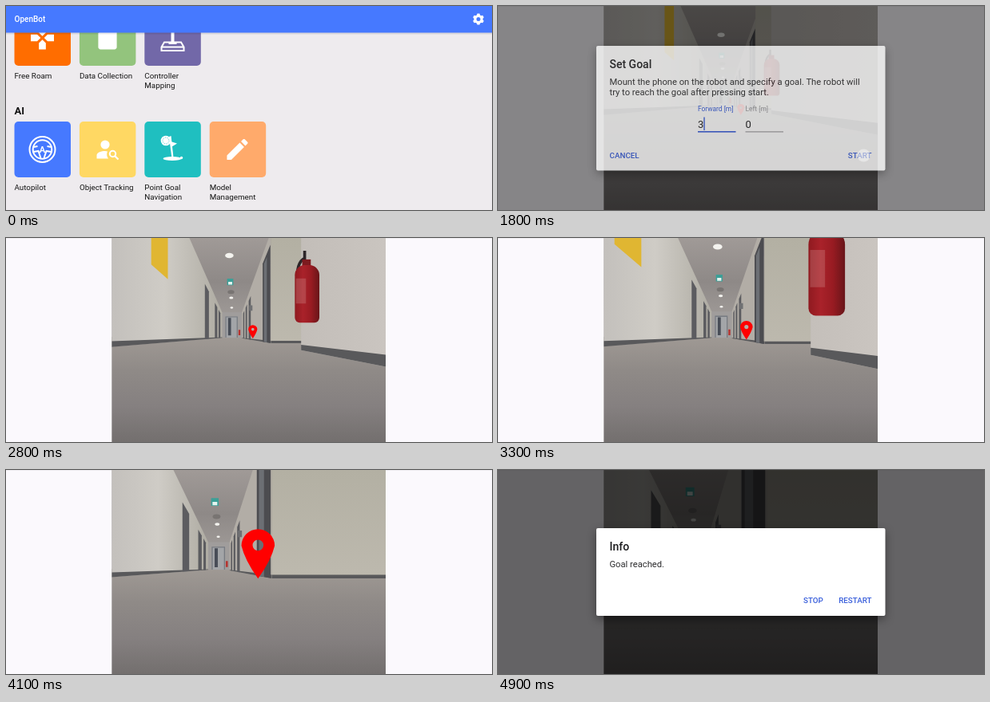
Write an HTML page with a canvas that moves like this. It is 608 px wide and 256 px high and loops after 5000 ms.

```html
<!DOCTYPE html>
<html lang="en">
<head>
<meta charset="utf-8">
<title>Point goal navigation</title>
<style>
  html, body { margin: 0; width: 100%; height: 100%; overflow: hidden; background: #fbf9fd; }
  canvas, svg { position: absolute; top: 0; left: 0; width: 608px; height: 256px; display: block; }
  text { font-family: Roboto, Arial, sans-serif; }
  .label { font-size: 9.8px; fill: #161616; }
  .body { font-size: 11.2px; fill: #2b2b2d; }
  .title { font-size: 14px; font-weight: 500; fill: #1d1d1f; }
  .button { font-size: 9.8px; font-weight: 500; fill: #375ddb; }
  .hint { font-size: 8.4px; }
  .value { font-size: 13px; fill: #1d1d1f; }
  .card { fill: #fff; filter: drop-shadow(0 4px 6px rgba(0,0,0,.4)); }
</style>
</head>
<body>
<canvas id="view" width="608" height="256"></canvas>
<svg viewBox="0 0 608 256">
  <rect id="dim" width="608" height="256"/>

  <g id="goal">
    <rect class="card" x="123" y="50" width="361.5" height="156.5" rx="2"/>
    <text class="title" x="139.5" y="78">Set Goal</text>
    <text class="body" x="139.5" y="99">Mount the phone on the robot and specify a goal. The robot will</text>
    <text class="body" x="139.5" y="112">try to reach the goal after pressing start.</text>
    <text class="hint" x="250" y="132" fill="#375ddb">Forward [m]</text>
    <text class="hint" x="309.5" y="132" fill="#9c9c9f">Left [m]</text>
    <text class="value" x="250" y="152.5">3</text>
    <text class="value" x="309.5" y="152.5">0</text>
    <rect x="257.3" y="139.5" width="1.4" height="16.5" fill="#375ddb"/>
    <rect x="250" y="157" width="47.5" height="1.6" fill="#375ddb"/>
    <rect x="309.5" y="157.4" width="47.5" height="1" fill="#8b8b8e"/>
    <text class="button" x="139.5" y="190.5">CANCEL</text>
    <text class="button" x="467.5" y="190.5" text-anchor="end">START</text>
  </g>

  <g id="info">
    <rect class="card" x="123" y="73" width="361.5" height="110" rx="2"/>
    <text class="title" x="139.5" y="101">Info</text>
    <text class="body" x="139.5" y="122">Goal reached.</text>
    <text class="button" x="382" y="167.3">STOP</text>
    <text class="button" x="467.5" y="167.3" text-anchor="end">RESTART</text>
  </g>

  <g id="menu">
    <rect width="608" height="256" fill="#eeebee"/>
    <g id="tiles"></g>
    <text x="10.5" y="136" font-size="13" font-weight="700" fill="#111">AI</text>

    <g fill="#fff">
      <path transform="translate(28.1 22.6) scale(1.45)" d="M15 7.5V2H9v5.5l3 3 3-3zM7.5 9H2v6h5.5l3-3-3-3zM9 16.5V22h6v-5.5l-3-3-3 3zM16.5 9l-3 3 3 3H22V9h-5.5z"/>
      <path transform="translate(109.6 22.6) scale(1.45)" d="M18 2h-8L4 8v12c0 1.1.9 2 2 2h12c1.1 0 2-.9 2-2V4c0-1.1-.9-2-2-2z"/>
      <path transform="translate(272.1 162.6) scale(1.45)" d="M3 17.25V21h3.75L17.81 9.94l-3.75-3.75L3 17.25zM20.71 7.04c.39-.39.39-1.02 0-1.41l-2.34-2.34c-.39-.39-1.02-.39-1.41 0l-1.83 1.83 3.75 3.75 1.83-1.83z"/>
    </g>

    <g fill="none" stroke="#fff" stroke-width="2">
      <path d="M194.5 56h28v-4.5l-3.5-6h-21l-3.5 6zM194.5 51.5h28"/>
      <path d="M208.5 28v18" stroke-width="4"/>
      <path d="M203.5 46.5h10" stroke-width="3"/>
    </g>

    <g transform="translate(45.5 180)" fill="none" stroke="#fff">
      <circle r="16" stroke-width="2"/>
      <circle r="11.8" stroke-width="2"/>
      <path d="M-11 3l6-1 3 9M11 3l-6-1-3 9M-11-3l5-1M11-3l-5-1" stroke-width="2"/>
      <text y="4" text-anchor="middle" font-size="11" font-weight="700" fill="#fff" stroke="none">A</text>
    </g>

    <g fill="#fff">
      <circle cx="124" cy="174" r="5.6"/>
      <path d="M113.5 191.5v-4c0-4 6-5.5 10.5-5.5l3 .4c-1.5 3-1 6.5 1 9.1z"/>
      <circle cx="133.5" cy="185.5" r="3.7" fill="none" stroke="#fff" stroke-width="2"/>
      <path d="M136 188l4.5 4.5" stroke="#fff" stroke-width="2.2"/>
    </g>

    <g fill="#fff">
      <circle cx="200" cy="169" r="6.3"/>
      <circle cx="200" cy="169" r="4" fill="none" stroke="#1fbfc0" stroke-dasharray="1 1.5"/>
      <path d="M204 164l2.5-1 3 27h-2.2z"/>
      <path d="M206 170l8 2.5-7.2 4.5z"/>
      <ellipse cx="208" cy="191.5" rx="11.5" ry="2.6"/>
      <circle cx="219.5" cy="190.5" r="1.7"/>
    </g>

    <rect y="33" width="608" height="2.5" fill="#000" opacity=".09"/>
    <rect width="608" height="33.5" fill="#4679ff"/>
    <text x="10.5" y="20" font-size="10" font-weight="500" fill="#fff">OpenBot</text>
    <g id="gear" transform="translate(591 16.5)" fill="#fff"></g>
  </g>
  <circle id="tap" r="8"/>
</svg>

<script>
const $ = id => document.getElementById(id);
const ctx = $('view').getContext('2d');
const LOOP = 5000, STEP = 100;
const clamp = v => Math.max(0, Math.min(1, v));

// ---- menu ----
const tiles = [
  [0, 5, '#ff6d00', 'Free Roam'],
  [1, 5, '#93c47d', 'Data Collection'],
  [2, 5, '#7268a8', 'Controller', 'Mapping'],
  [0, 145, '#4679ff', 'Autopilot'],
  [1, 145, '#ffd863', 'Object Tracking'],
  [2, 145, '#1fbfc0', 'Point Goal', 'Navigation'],
  [3, 145, '#ffaa6b', 'Model', 'Management']
];
$('tiles').innerHTML = tiles.map(([col, y, fill, ...lines]) => {
  const x = 10.5 + col * 81.4;
  return `<rect x="${x}" y="${y}" width="70.5" height="70" rx="5" fill="${fill}"/>` +
    lines.map((s, i) => `<text class="label" x="${x}" y="${y + 86 + i * 12}">${s}</text>`).join('');
}).join('');

$('gear').innerHTML = '<circle r="4" fill="none" stroke="#fff" stroke-width="3"/>' +
  [0, 60, 120, 180, 240, 300].map(a =>
    `<path d="M-2.2-4.5L-1.5-7h3L2.2-4.5z" transform="rotate(${a})"/>`).join('');

// ---- corridor ----
// time, vanishing point x, distance driven, sideways drift, marker depth, marker x, marker y
const poses = [
  [1800, 283, 0, 0, 2.5, 52, 32],
  [2800, 284, 1.6, 0, 2.06, 51, 4],
  [3700, 280, 3.3, 30, 1, 36, 6],
  [4500, 258, 5, 50, .114, 15.6, 7.75],
  [4900, 251, 5.7, 60, .1, 15, 7.7]
];
const HORIZON = 124, CEIL = 1000, LEFT = -440, RIGHT = 360, NEAR = 305;
const END = 34, NICHE = 9.2, CORNER = 5.18;
const SKIRT = '#59595b', FRAME = '#5c5c60';
let vx, dist, drift;

function poseAt(t) {
  if (t <= poses[0][0]) return poses[0];
  const i = poses.findIndex(p => p[0] >= t);
  const a = poses[i - 1], b = poses[i], k = (t - a[0]) / (b[0] - a[0]);
  return a.map((v, n) => v + (b[n] - v) * k);
}

function project(x, y, z) {
  const depth = Math.max(z - dist, .2);
  return [vx + (x - drift) / depth, HORIZON - y / depth];
}

function poly(fill, ...pts) {
  ctx.fillStyle = fill;
  ctx.beginPath();
  pts.forEach(p => ctx.lineTo(...project(...p)));
  ctx.fill();
}

// panel along the corridor, and panel facing the viewer
const side = (fill, x, z0, z1, lo, hi) =>
  poly(fill, [x, lo, z0], [x, hi, z0], [x, hi, z1], [x, lo, z1]);
const front = (fill, z, x0, x1, lo, hi) =>
  poly(fill, [x0, lo, z], [x0, hi, z], [x1, hi, z], [x1, lo, z]);

function blend(x0, y0, x1, y1, ...colors) {
  const g = ctx.createLinearGradient(x0, y0, x1, y1);
  colors.forEach((c, i) => g.addColorStop(i / (colors.length - 1), c));
  return g;
}

function disc(fill, x, z, r) {
  const [px, py] = project(x, CEIL, z), s = r / (z - dist);
  ctx.fillStyle = fill;
  ctx.beginPath();
  ctx.ellipse(px, py, s, s * .6, 0, 0, 7);
  ctx.fill();
}

function extinguisher() {
  const z = 4.47, depth = z - dist;
  if (depth < .3) return;
  const [x, y] = project(222, 258, z);
  const w = 88 / depth, h = 207 / depth;
  ctx.strokeStyle = '#2c2528';
  ctx.lineWidth = w * .12;
  ctx.beginPath();
  ctx.moveTo(x + w * .4, y);
  ctx.lineTo(x + w * .4, y - h * .25);
  ctx.moveTo(x + w * .4, y - h * .12);
  ctx.quadraticCurveTo(x + w * .05, y - h * .05, x + w * .1, y + h * .3);
  ctx.stroke();
  ctx.fillStyle = '#7d1a1f';
  ctx.fillRect(x + w * .3, y - h * .1, w * .35, h * .12);
  ctx.fillStyle = blend(x, 0, x + w, 0, '#8f1a20', '#a9222a', '#981b22', '#681519');
  ctx.beginPath();
  ctx.roundRect(x, y, w, h, [w * .4, w * .4, w * .2, w * .2]);
  ctx.fill();
  front('rgba(225,190,188,.22)', z, 226, 262, 120, 210);
}

function corridor() {
  ctx.fillStyle = blend(0, 0, 0, 110, '#a09a97', '#8e8987', '#a39e9b');
  ctx.fillRect(132, 0, 344, 256);
  ctx.fillStyle = blend(0, 122, 0, 256, '#a09a95', '#8f8a87', '#858080', '#736f6e');
  ctx.fillRect(132, HORIZON, 344, 132);

  // far end
  front('#a09d9c', END, LEFT, RIGHT, -40, CEIL);
  front('#777b82', END, -310, 190, -30, 830);
  front('#a3a5a8', END, -270, 150, -30, 790);
  front('#484d57', END, -200, -80, 60, 770);

  // left wall
  side(blend(132, 0, vx - 20, 0, '#c3c0bc', '#cfccc6', '#b1aea5'), LEFT, 0, END, -36, CEIL);
  side(SKIRT, LEFT, 0, END, -37, -16);
  for (const [a, b] of [[14.1, 16.2], [21, 24], [26, 29.5]])
    side(FRAME, LEFT, a, b, -36, 830);
  side('#e0b632', LEFT, 5.9, 7, 390, 1400);

  // right wall
  side('#b2ada6', RIGHT, NICHE, END, -60, CEIL);
  side(SKIRT, RIGHT, NICHE, END, -60, -38);
  for (const [a, b] of [[17.8, 20], [22, 24.5], [27, 30]])
    side(FRAME, RIGHT, a, b, -60, 830);
  side('#4c4c50', RIGHT, 9.3, 11.3, -60, 890);
  side('#6c6f74', RIGHT, 10.1, 10.9, -60, 850);
  front('#6f7073', 16, 290, 350, 470, 570);
  front('#b5332f', END - 3, 200, 270, 60, 260);

  // ceiling fittings
  disc('#787472', -45, 19.4, 75);
  for (const z of [11.4, 22, 29]) disc('#f4f3ef', -45, z, 52);
  front('#3c9f97', 15.87, -105, 5, 925, 1040);
  front('#e6f4f0', 15.87, -85, -15, 935, 985);

  // niche wall, then the closer wall beside it
  front(blend(0, 0, 0, 135, '#b3b0a3', '#bdb9ae'), NICHE, RIGHT, 1500, -60, 1300);
  front(SKIRT, NICHE, RIGHT, 1500, -60, -38);
  if (CORNER - dist > .4) {
    side(blend(360, 0, 476, 0, '#c2bdb8', '#cac5c0'), NEAR, 0, CORNER, -60, 1300);
    side(SKIRT, NEAR, 0, CORNER, -60, -36);
  }
  extinguisher();
}

function marker(z, x, y) {
  ctx.save();
  ctx.translate(vx + x / z, HORIZON + y / z);
  ctx.scale(1 / z, 1 / z);
  ctx.fillStyle = '#f00';
  ctx.beginPath();
  ctx.moveTo(0, 0);
  ctx.quadraticCurveTo(-9.2, -12.8, -11.6, -23);
  ctx.arc(0, -23, 11.6, Math.PI, 0);
  ctx.quadraticCurveTo(9.2, -12.8, 0, 0);
  ctx.moveTo(3.8, -23.4);
  ctx.arc(0, -23.4, 3.8, 0, 7);
  ctx.fill('evenodd');
  ctx.restore();
}

function tap(x, y, color) {
  const el = $('tap');
  el.setAttribute('cx', x);
  el.setAttribute('cy', y);
  el.setAttribute('fill', color);
}

function draw(t) {
  const goal = t < 900 ? 0 : clamp(1 - (t - 1767) / 150);
  const info = clamp((t - 4650) / 150);
  const shade = Math.max(goal, info);

  $('menu').style.display = t < 900 ? '' : 'none';
  $('goal').style.opacity = goal;
  $('info').style.opacity = info;
  $('dim').style.opacity = shade * .6;

  const onTile = t >= 500 && t < 800, onStart = t >= 1600 && t < 1900;
  $('tap').style.opacity = onTile || onStart ? .55 : 0;
  if (onTile) tap(208, 180, '#e9e9e9');
  if (onStart) tap(457.5, 187.5, '#f4f4f4');

  const [, px, d, c, mz, mx, my] = poseAt(t);
  [vx, dist, drift] = [px, d, c];
  ctx.fillStyle = '#fbf9fd';
  ctx.fillRect(0, 0, 608, 256);
  ctx.fillStyle = '#eeecf0';
  ctx.fillRect(0, 0, 608, 1);
  ctx.save();
  ctx.beginPath();
  ctx.rect(132.5, 0, 342.5, 256);
  ctx.clip();
  corridor();
  if (t < 4600) marker(mz, mx, my);
  ctx.fillStyle = `rgba(0,0,0,${shade * (info ? .3 : .17)})`;
  ctx.fillRect(132, 0, 344, 256);
  ctx.restore();
}

const start = performance.now();
function tick() {
  const t = (performance.now() - start) % LOOP;
  draw(Math.floor(t / STEP) * STEP);
  requestAnimationFrame(tick);
}
tick();
</script>
</body>
</html>
```
